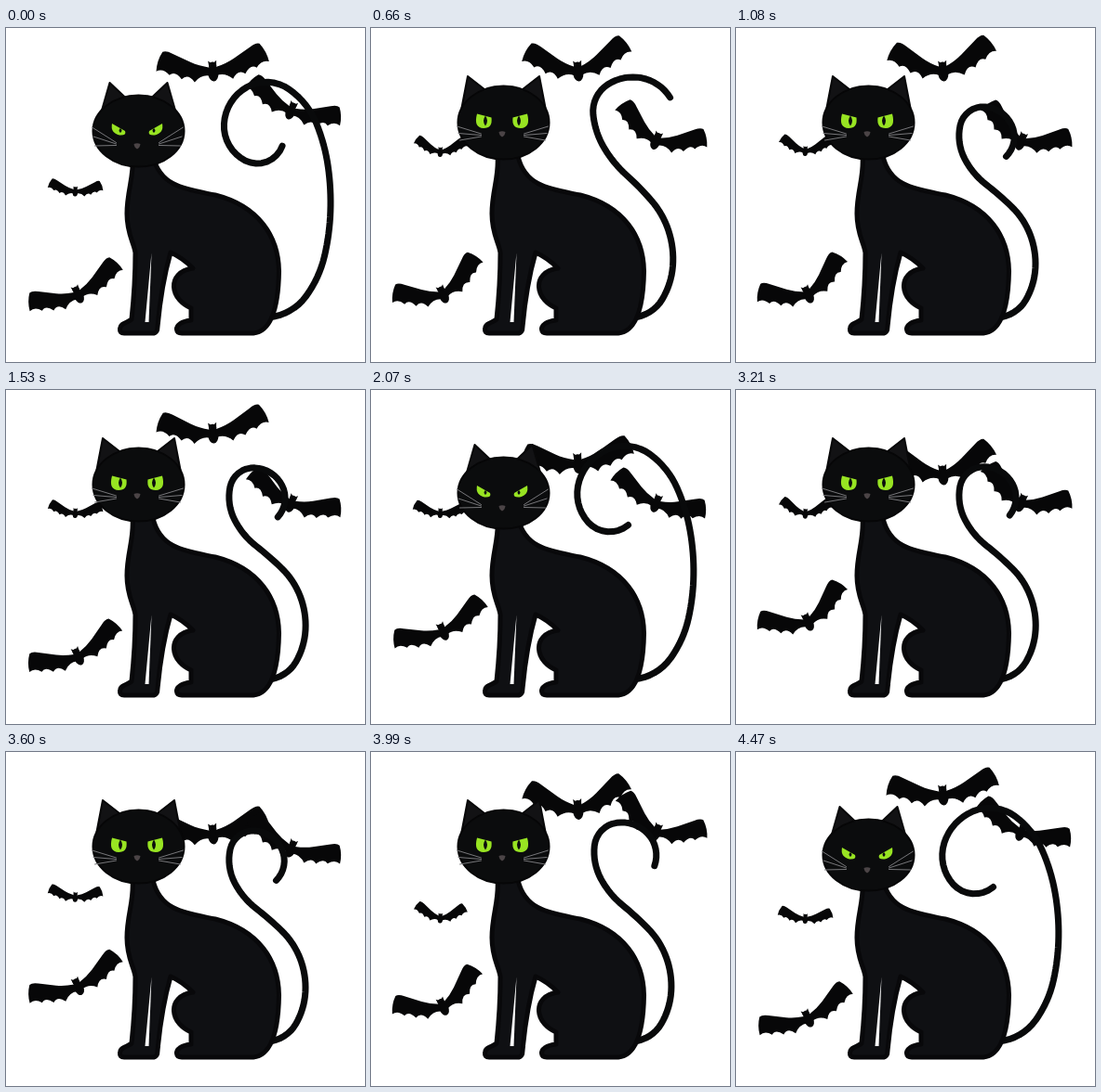
An HTML page that plays this animation: 386 by 360 pixels, repeating every 4.5 s.

```html
<!DOCTYPE html>
<html lang="en">
<head>
<meta charset="utf-8">
<title>Black cat and bats</title>
<style>
html, body { margin: 0; width: 100%; height: 100%; overflow: hidden; background: #fff; }
svg { display: block; width: 100vw; height: 100vh; }
</style>
</head>
<body>
<svg viewBox="0 0 386 360">
  <defs>
    <path id="wing" d="M3 -3Q14 -7 22 -13L39 -26Q45 -31 49 -30Q57 -22 60 -11Q52 -13 47 -4Q40 -8 35 3Q27 -2 22 9Q13 2 4 6Z"/>
    <g id="torso">
      <path d="M-4 -4L-4.500 -10L-1.500 -7.500H1.500L4.500 -10L4 -4Z"/>
      <ellipse cy="-4" rx="4.200" ry="4.500"/>
      <ellipse cy="4" rx="5.500" ry="8.500"/>
    </g>
  </defs>
  <g id="bats" fill="#070708"></g>
  <path id="tail" fill="none" stroke="#090a0b" stroke-width="7" stroke-linecap="round" stroke-linejoin="round"/>
  <path fill="#0f1013" stroke="#08080a" stroke-width="5" stroke-linejoin="round" d="M136 138C138 160 130 175 130 200C130 222 137 230 139 242C139 270 137 295 135 314C130 318 123 318 122.500 324Q122 329 127 329H159Q163 328 163 322C165 300 169 270 177 242C186 246 195 253 201 259C186 261 180 270 180.500 279C181 290 190 298 199 302L199 315C189 316 183 320 183.500 325Q184 329 189 329H266C286 327 293 300 293.500 262C293 225 272 192 225 180C195 174 166 172 158 138Z"/>
  <path d="M156.500 242L149.500 317H153.500Z" fill="#fff"/>
  <path id="ears" fill="#121214" stroke="#080809" stroke-width="2" stroke-linejoin="round"/>
  <ellipse id="head" cx="142.500" rx="49" fill="#0b0c0d" stroke="#060607" stroke-width="2"/>
  <path id="whiskers" fill="none" stroke="#77777a" stroke-width="1" stroke-linecap="round"/>
  <path id="nose" d="M-3.500 -3Q0 -4.500 3.500 -3Q3 1 0 2.500Q-3 1 -3.500 -3Z" fill="#4b4446"/>
  <path id="eyes" fill="#98e422"/>
  <path id="pupils" fill="#0b0c0d"/>
</svg>
<script>
const LOOP = 4500, CYCLE = 2400, FLAP = 300;
const $ = id => document.getElementById(id);
const set = (id, k, v) => $(id).setAttribute(k, v);
const clamp = v => Math.min(1, Math.max(0, v));
const ease = (t, a, b) => (1 - Math.cos(Math.PI * clamp((t - a) / (b - a)))) / 2;
const mix = (a, b, p) => a + (b - a) * p;
const mixAll = (a, b, p) => a.map((v, i) => mix(v, b[i], p));
const both = (shape, axis) => shape(x => axis + x) + shape(x => axis - x);

// Headings in degrees at even steps from root to tip
const S_BEND = [-5, -60, -87, -111, -136, -142, -117, -78, 4, 65, 135];
const CURL = [-5, -54, -77, -88, -98, -112, -145, -210, -267, -333, -430];

function tailPath(p) {
  const keys = mixAll(S_BEND, CURL, p), spans = keys.length - 1;
  const n = 80, step = mix(365, 482, p) / n;
  let x = 282, y = 312, d = `M${x} ${y}`;
  for (let i = 0; i < n; i++) {
    const f = (i + 0.5) / n * spans, k = Math.floor(f);
    const a = mix(keys[k], keys[k + 1], f - k) * Math.PI / 180;
    x += step * Math.cos(a);
    y += step * Math.sin(a);
    d += `L${x.toFixed(2)} ${y.toFixed(2)}`;
  }
  return d;
}

// Half-face shapes: x is the distance from the face axis; low = 1 is the lowered head
function drawHead(low) {
  const at = (up, down) => mix(up, down, low);
  set('head', 'cy', at(102, 111));
  set('head', 'ry', at(39.5, 38.5));
  set('nose', 'transform', `translate(141 ${at(115, 128)})`);

  const ear = mixAll([45, 86, 38.5, 52, 18, 68], [41, 94, 31, 59, 13, 76], low);
  set('ears', 'd', both(m =>
    `M${m(ear[0])} ${ear[1]}L${m(ear[2])} ${ear[3]}L${m(ear[4])} ${ear[5]}Z`, 142.5));

  const e = mixAll([27, 92.5, 11.5, 96.5, 10, 108, 20, 108, 31, 107.5],
                   [27, 103, 13, 111, 11, 116, 19, 115.5, 29, 113], low);
  set('eyes', 'd', both(m => `M${m(e[0])} ${e[1]}L${m(e[2])} ${e[3]}` +
    `Q${m(e[4])} ${e[5]} ${m(e[6])} ${e[7]}Q${m(e[8])} ${e[9]} ${m(e[0])} ${e[1]}Z`, 141));

  const y = at(100, 110.5), h = at(5.5, 2.5), w = at(4, 3);
  set('pupils', 'd', both(m =>
    `M${m(18)} ${y - h}Q${m(18 + w)} ${y} ${m(18)} ${y + h}Q${m(18 - w)} ${y} ${m(18)} ${y - h}Z`, 141));

  set('whiskers', 'd', both(m => [-1, 0, 1].map(i =>
    `M${m(23)} ${at(115.5, 125) + 1.5 * i}L${m(47.5 - 1.5 * i)} ${at(113.5, 117) + at(7.5, 10) * i}`).join(''), 141.5));
}

const early = t => ease(t, -160, 740) - ease(t, 3150, 4050);
const late = t => ease(t, 1500, 2380) - ease(t, 3450, 4350);
const bats = [
  { x: 222.5, y: [45, 90], size: 1, tilt: -5, go: late },
  { x: 307, y: [85, 121], size: 0.9, tilt: 22, go: early },
  { x: 74.5, y: [179, 132], size: 0.49, tilt: 3, go: early },
  { x: 77, y: [286, 249], size: 0.9, tilt: -24, go: late }
];
for (const b of bats) {
  $('bats').insertAdjacentHTML('beforeend',
    '<g><use href="#torso"/><use href="#wing"/><use href="#wing"/></g>');
  b.el = $('bats').lastElementChild;
  [, b.right, b.left] = b.el.children;
}

function draw(t) {
  const beat = Math.cos(2 * Math.PI * (t / FLAP - 0.47));
  const lift = `rotate(${7 - 11 * clamp((beat + 0.75) / 0.7)})`;
  for (const b of bats) {
    b.el.setAttribute('transform',
      `translate(${b.x} ${mix(...b.y, b.go(t))}) rotate(${b.tilt}) scale(${b.size})`);
    b.right.setAttribute('transform', lift);
    b.left.setAttribute('transform', 'scale(-1 1) ' + lift);
  }
  const c = t % CYCLE;
  set('tail', 'd', tailPath(1 - ease(c, 0, 870) + ease(c, 1500, 2170)));
  drawHead(1 - ease(c, 60, 500) + ease(c, 1620, 2060));
}

const start = performance.now();
function tick() {
  draw((performance.now() - start) % LOOP);
  requestAnimationFrame(tick);
}
draw(0);
requestAnimationFrame(tick);
</script>
</body>
</html>
```
